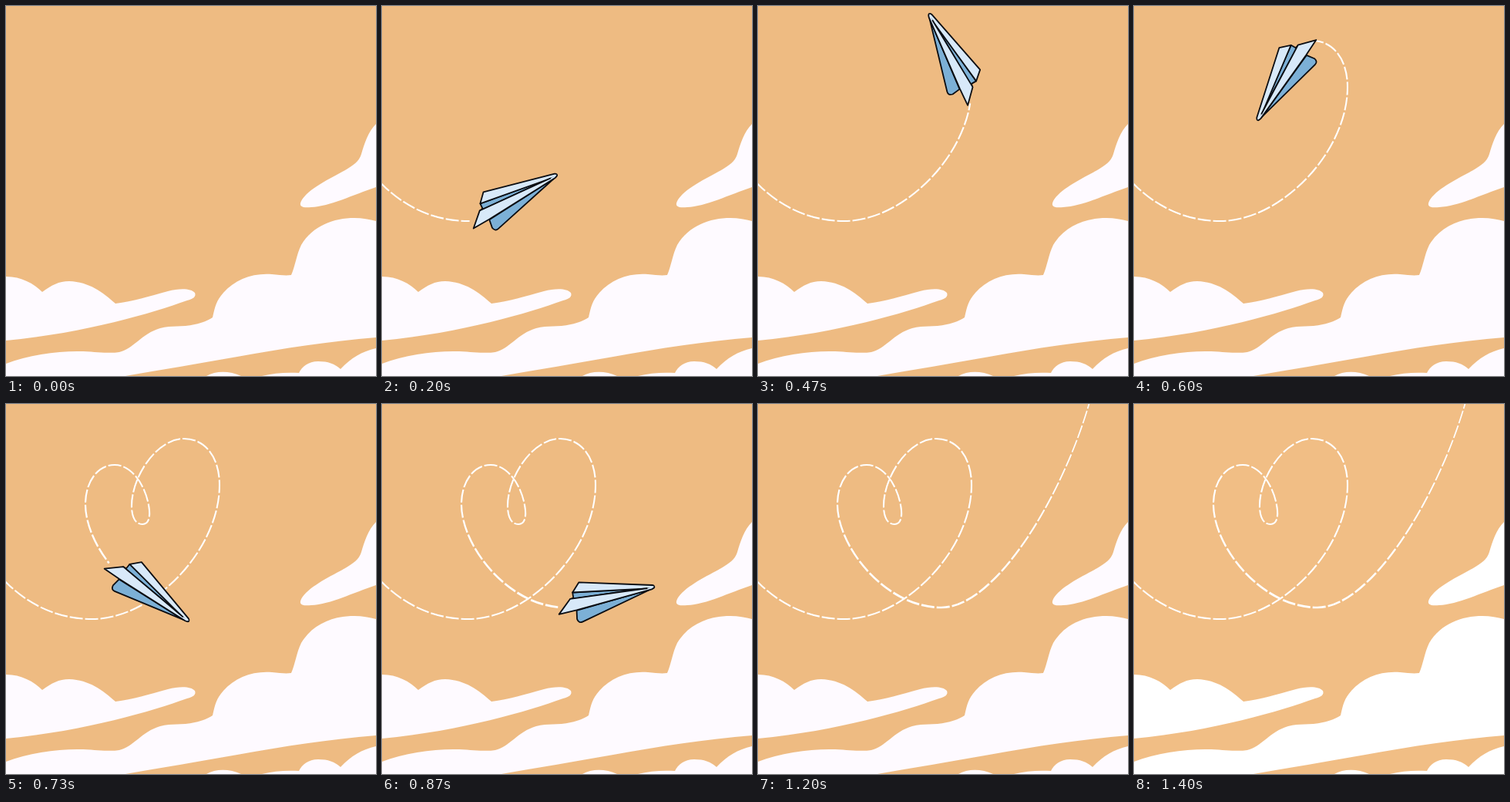
Animation of 480x480 px, one loop 2.99 s. Source, as an HTML page:

```html
<!DOCTYPE html>
<html lang="en">
<head>
<meta charset="utf-8">
<title>Paper plane</title>
<style>
  html, body { margin: 0; height: 100%; overflow: hidden; }
  svg { display: block; width: 100vw; height: 100vh; }
  #trail path { fill: none; stroke: #fff; }
  #plane { stroke: #0b0d12; stroke-width: 1.8; stroke-linejoin: round; }
  .light { fill: #d8e9f9; }
  .shade { fill: #7cb0d6; }
</style>
</head>
<body>
<svg viewBox="0 0 480 480">
  <rect id="sky" width="480" height="480"/>
  <g id="clouds">
    <path d="M480 153C470 163 465 178 461 192C458 202 450 207 440 213C420 224 392 237 383 253C379 261 386 262 396 261C420 260 450 245 480 235Z"/>
    <path d="M0 464C30 452 70 447 100 448C120 449 135 451 147 449C165 445 176 425 200 418C215 414 228 417 245 413C255 411 262 408 268 404C271 390 273 382 282 372C297 355 320 346 345 348C355 349 363 350 370 349C375 338 377 322 383 310C398 285 425 275 452 275C462 275 472 277 480 279V430C420 435 360 444 300 455C250 464 200 472 155 480H0Z"/>
    <path d="M0 351C20 351 36 360 47 371C60 362 68 357 82 357C108 358 125 371 142 386C165 383 185 377 210 370C225 366 240 366 245 372C247 377 243 380 235 382C190 398 105 424 0 434Z"/>
    <path d="M260 480C272 473 290 473 305 480Z"/>
    <path d="M332 480C347 476 365 475 380 476C384 468 392 461 405 461C418 461 426 464 434 471C447 457 462 448 480 444V480Z"/>
  </g>
  <g id="trail">
    <path id="route" stroke="none" style="stroke:none" d="M-3 228C25 258 65 279 112 279C190 279 277 190 277 105C277 70 259 45 231 45C195 45 163 95 163 132C163 147 168 156 177 156C184 156 187 149 186 138C183 108 164 79 141 79C118 79 103 102 103 130C103 185 165 264 238 264C308 264 395 120 430 -2"/>
  </g>
  <!-- nose at the origin, tail along +x -->
  <g id="plane">
    <path class="shade" d="M9 0L105 -16L105.5 -9L110 -8Z"/>
    <path class="light" d="M9 1L2 2Q-2 0 2 -2L94 -27L105 -16Z"/>
    <path class="shade" d="M6 3L105 8L107 19Q106 25 101 24Z"/>
    <path class="light" d="M9 .5L110 -8.5L128.5 7.7L105 7.5L4 3Q-1 2 0 0"/>
  </g>
</svg>
<script>
const LOOP = 2990, BRIGHTEN = 1330, TICK = 1000 / 15;
const DASH = 17, GAP = 3, PLANE = 122;
const $ = id => document.getElementById(id);

// Key poses: [tick, distance flown, heading in degrees]
const keys = [
  [3, 138, -29.6], [7, 376, -116], [9, 480, -237],
  [11, 890, -325], [15, 1117, -421], [18, 1360, -430]
];

const route = $('route');
const total = route.getTotalLength();

// One stroke per dash, boldest under the heart and thinnest at the end
const dashes = [];
for (let s = 0; s < total; s += DASH + GAP) {
  const line = route.cloneNode();
  line.removeAttribute('id');
  line.removeAttribute('style');
  const bold = 0.8 * Math.exp(-(((s - 990) / 160) ** 2));
  line.setAttribute('stroke-width', 2.1 - 0.5 * (s / total) ** 4 + bold);
  dashes.push({ s, line: $('trail').appendChild(line) });
}

function pose(tick) {
  const next = Math.max(1, keys.findIndex(key => key[0] >= tick));
  const a = keys[next - 1], b = keys[next];
  const k = (tick - a[0]) / (b[0] - a[0]);
  return [1, 2].map(i => a[i] + (b[i] - a[i]) * k);
}

// Every fourth drawing is held during the first part of the flight
function tickAt(t) {
  const tick = Math.min(18, Math.floor((t + 3.4) / TICK));
  return tick < 16 && tick % 4 === 0 ? tick - 1 : tick;
}

function draw(t) {
  const bright = t >= BRIGHTEN;
  $('sky').setAttribute('fill', bright ? '#f1be85' : '#eebb82');
  $('clouds').setAttribute('fill', bright ? '#fff' : '#fefaff');

  const tick = tickAt(t);
  const [flown, heading] = tick < 2 ? [0, 0] : pose(tick);
  for (const { s, line } of dashes) {
    const length = Math.min(DASH, flown - 7 - s);
    line.style.display = length > 0 ? '' : 'none';
    if (length > 0) line.setAttribute('stroke-dasharray', `0 ${s} ${length} 9999`);
  }

  const flying = flown > 0 && flown < total;
  $('plane').style.display = flying ? '' : 'none';
  if (!flying) return;
  const tail = route.getPointAtLength(flown);
  const angle = heading * Math.PI / 180;
  const x = tail.x + PLANE * Math.cos(angle), y = tail.y + PLANE * Math.sin(angle);
  const side = Math.cos(angle) < 0 ? 1 : -1; // the keel hangs below
  $('plane').setAttribute('transform', `translate(${x} ${y}) rotate(${heading + 180}) scale(1 ${side})`);
}

const start = performance.now();
function frame() {
  draw((performance.now() - start) % LOOP);
  requestAnimationFrame(frame);
}
frame();
</script>
</body>
</html>
```
